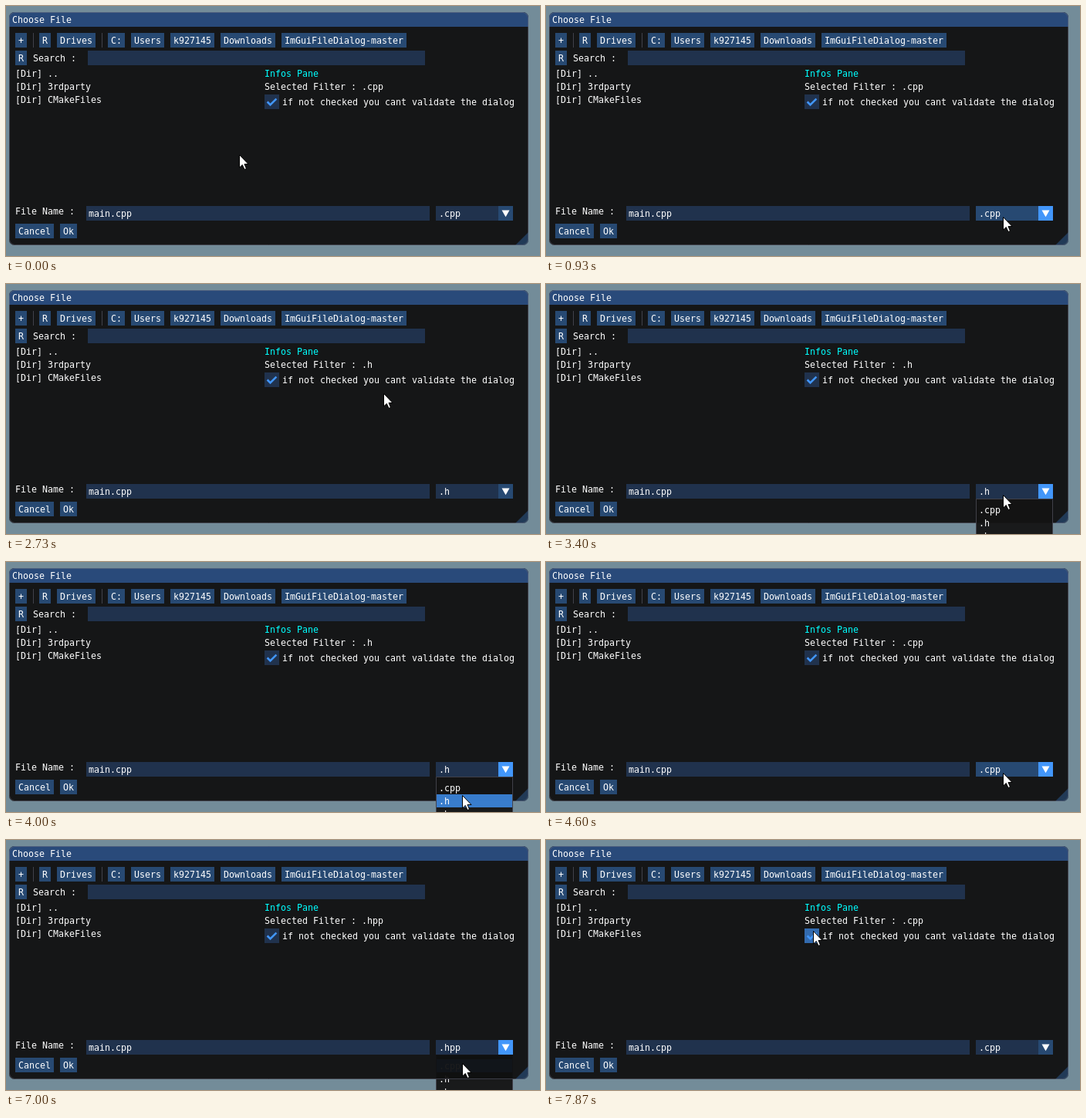
Animation, 692 px wide and 325 px high, one loop 8 s. Source, as an HTML page with a canvas:

```html
<!DOCTYPE html>
<html lang="en">
<head>
<meta charset="utf-8">
<title>Choose File</title>
<style>
html, body { margin: 0; width: 100%; height: 100%; overflow: hidden; background: #738c99; }
canvas { display: block; }
</style>
</head>
<body>
<canvas id="stage" width="692" height="325"></canvas>
<script>
const ctx = document.getElementById('stage').getContext('2d');
const FPS = 15, TICKS = 8 * FPS;
const CELL = 7, ITEM = 19, ROW = 17;
const WIN = { x: 4, y: 8, w: 673, h: 303, r: 7 };
const COMBO = { x: 557, y: 260, w: 100, h: ITEM };
const CHECK = { x: 335, y: 115, w: ITEM, h: ITEM };
const FILTERS = ['.cpp', '.h', '.hpp'];

const blue = a => `rgba(66,150,250,${a})`;
const COLOR = {
  back: '#738c99',
  window: 'rgba(15,15,15,.94)',
  popup: 'rgba(20,20,20,.94)',
  title: 'rgb(41,74,122)',
  frame: 'rgba(41,74,122,.54)',
  border: 'rgba(110,110,128,.5)',
  text: '#fff',
  info: '#0ff'
};

const rowArea = i => ({ x: COMBO.x, y: 285 + i * ROW, w: COMBO.w, h: ROW });
const inside = (p, r) => p.x >= r.x && p.x < r.x + r.w && p.y >= r.y && p.y < r.y + r.h;

// ---- Timeline, counted in ticks of 1/15 s ----
const linear = u => u;
const easeOut = u => 1 - (1 - u) ** 3;
const legs = [], visits = [];
let end = { x: 302, y: 193 };

// Moves the pointer from where it rests; bend bows the path downwards
function go(start, stop, x, y, { bend = 0, ease = linear } = {}) {
  legs.push({ start, stop, from: end, to: { x, y }, bend, ease });
  end = { x, y };
}

// Goes to the combo, opens its list, settles on a row and picks it
function visit({ leave, arrive, open, settle, drop, choice, bend }) {
  go(leave, arrive, 592, 274);
  go(open, settle, 591, 290 + 19 * choice, { bend });
  visits.push({ open, drop, done: drop + 1, choice });
}

go(0, 4, 427, 186, { bend: 5 });
visit({ leave: 7, arrive: 14, open: 17, settle: 20, drop: 26, choice: 1 });
go(27, 32, 338, 112);
go(32, 37, 460, 104);
visit({ leave: 39, arrive: 48, open: 51, settle: 61, drop: 65, choice: 0, bend: 46 });
visit({ leave: 65, arrive: 69, open: 75, settle: 79, drop: 86, choice: 2 });
visit({ leave: 86, arrive: 91, open: 97, settle: 102, drop: 105, choice: 0 });
go(105, 114, 346, 118, { ease: easeOut });
const CHECK_PRESS = 118;

function pointerAt(tick) {
  const leg = legs.filter(l => l.start <= tick).pop();
  const u = Math.min(1, (tick - leg.start) / (leg.stop - leg.start));
  const mix = axis => leg.from[axis] + (leg.to[axis] - leg.from[axis]) * leg.ease(u);
  return {
    x: Math.round(mix('x')),
    y: Math.round(mix('y') + leg.bend * Math.sin(Math.PI * u))
  };
}

function stateAt(tick) {
  const current = visits.find(v => tick >= v.open && tick < v.done);
  const last = visits.filter(v => tick >= v.done).pop();
  return {
    pointer: pointerAt(tick),
    opened: !!current,
    behind: !!current && tick >= current.drop,
    filter: FILTERS[last ? last.choice : 0],
    checkPressed: tick >= CHECK_PRESS
  };
}

// ---- Drawing ----
function rect(x, y, w, h, color) {
  ctx.fillStyle = color;
  ctx.fillRect(x, y, w, h);
}

function outline(color, width) {
  ctx.strokeStyle = color;
  ctx.lineWidth = width;
  ctx.stroke();
}

function text(str, x, top, color = COLOR.text) {
  ctx.fillStyle = color;
  ctx.fillText(str, x, top + 11);
}

function trace(points) {
  ctx.beginPath();
  points.forEach(([x, y]) => ctx.lineTo(x, y));
}

function fillShape(points, color) {
  trace(points);
  ctx.closePath();
  ctx.fillStyle = color;
  ctx.fill();
}

// Draws a button and returns the x where the next item starts
function button(label, x, y) {
  const w = label.length * CELL + 8;
  rect(x, y, w, ITEM, blue(.4));
  text(label, x + 4, y + 3);
  return x + w + 8;
}

function separator(x, y) {
  rect(x, y, 1, ITEM, COLOR.border);
  return x + 8;
}

function drawCheckbox({ pointer, checkPressed }) {
  const { x, y } = CHECK;
  const color = checkPressed ? blue(.67) : inside(pointer, CHECK) ? blue(.4) : COLOR.frame;
  rect(x, y, ITEM, ITEM, color);
  trace([[x + 3.6, y + 9.5], [x + 7.5, y + 13.4], [x + 15.4, y + 5.6]]);
  outline(blue(1), 2.6);
}

function drawCombo({ pointer, opened, filter }) {
  const { x, y, w } = COMBO;
  const hovered = !opened && inside(pointer, COMBO);
  const arrowX = x + w - ITEM, cx = arrowX + ITEM / 2, cy = y + ITEM / 2;
  rect(x, y, w - ITEM, ITEM, hovered ? blue(.4) : COLOR.frame);
  rect(arrowX, y, ITEM, ITEM, blue(hovered || opened ? 1 : .4));
  text(filter, x + 4, y + 3);
  fillShape([[cx, cy + 4.8], [cx - 5, cy - 4], [cx + 5, cy - 4]], COLOR.text);
}

function drawPopup({ pointer }) {
  const { x, w } = COMBO, y = COMBO.y + ITEM, h = FILTERS.length * ROW + 16;
  rect(x, y, w, h, COLOR.popup);
  ctx.beginPath();
  ctx.rect(x + .5, y + .5, w - 1, h - 1);
  outline(COLOR.border, 1);
  FILTERS.forEach((name, i) => {
    const row = rowArea(i);
    if (inside(pointer, row)) rect(row.x + 1, row.y, row.w - 2, row.h, blue(.8));
    text(name, row.x + 4, row.y + 2);
  });
}

function drawPanel() {
  const { x, y, w, h, r } = WIN, right = x + w, bottom = y + h;
  ctx.save();
  ctx.beginPath();
  ctx.roundRect(x, y, w, h, r);
  ctx.clip();
  rect(x, y, w, h, COLOR.window);
  rect(x, y, w, ITEM, COLOR.title);
  fillShape([[right - ROW, bottom], [right, bottom - ROW], [right, bottom]], blue(.28));
  ctx.restore();
  ctx.beginPath();
  ctx.roundRect(x + .5, y + .5, w - 1, h - 1, r);
  outline(COLOR.border, 1);
  text('Choose File', x + 4, y + 3);
}

function drawDialog(state) {
  const left = WIN.x + 8, pane = CHECK.x;
  drawPanel();

  let x = separator(button('+', left, 35), 35);
  x = separator(button('Drives', button('R', x, 35), 35), 35);
  for (const part of ['C:', 'Users', 'k927145', 'Downloads', 'ImGuiFileDialog-master'])
    x = button(part, x, 35);

  text('Search :', button('R', left, 58), 61);
  rect(106, 58, 437, ITEM, COLOR.frame);

  ['..', '3rdparty', 'CMakeFiles'].forEach((name, i) => text('[Dir] ' + name, left, 81 + i * ROW));

  text('Infos Pane', pane, 81, COLOR.info);
  text('Selected Filter : ' + state.filter, pane, 81 + ROW);
  drawCheckbox(state);
  text('if not checked you cant validate the dialog', pane + ITEM + 4, CHECK.y + 3);

  text('File Name :', left, COMBO.y);
  rect(104, COMBO.y, 445, ITEM, COLOR.frame);
  text('main.cpp', 107, COMBO.y + 3);
  drawCombo(state);
  button('Ok', button('Cancel', left, 283), 283);
}

function drawPointer({ x, y }) {
  ctx.save();
  ctx.translate(x + .5, y + .5);
  fillShape([[0, 0], [0, 16.5], [3.8, 13], [6.5, 19], [9, 18], [6.5, 12], [11.5, 12]], '#fff');
  outline('#000', 1);
  ctx.restore();
}

function draw(ms) {
  // The small lead keeps ticks steady against rounded clock times
  const state = stateAt(Math.floor((ms + 4) * FPS / 1000) % TICKS);
  ctx.font = '11.63px "DejaVu Sans Mono", monospace';
  rect(0, 0, 692, 325, COLOR.back);
  if (state.behind) drawPopup(state);
  drawDialog(state);
  if (state.opened && !state.behind) drawPopup(state);
  drawPointer(state.pointer);
}

const start = performance.now();
function loop() {
  draw(performance.now() - start);
  requestAnimationFrame(loop);
}
loop();
</script>
</body>
</html>
```
